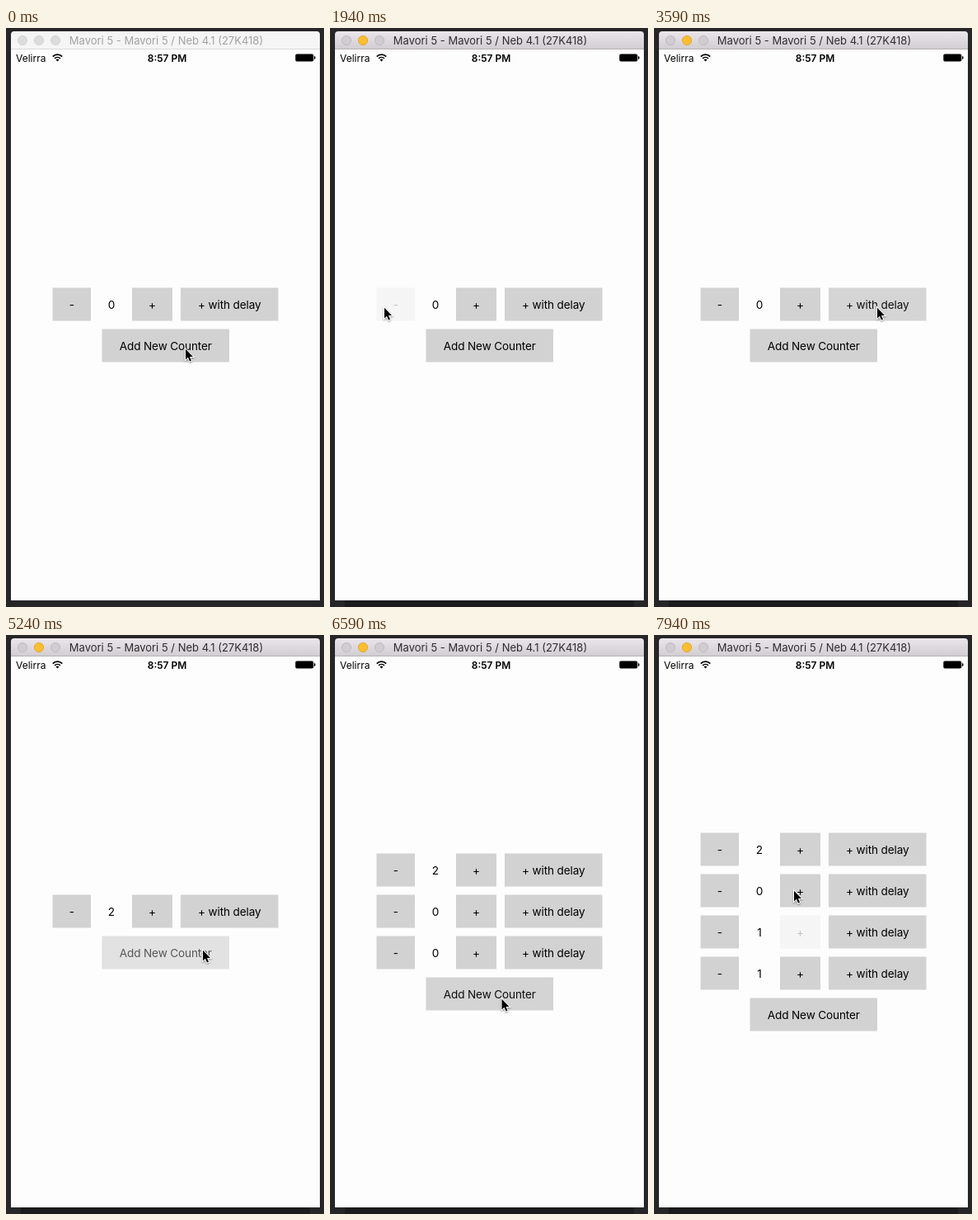
An HTML page with a canvas that plays this animation: 386 px wide and 701 px high, repeating every 8 s.

```html
<!DOCTYPE html>
<html lang="en">
<head>
<meta charset="utf-8">
<title>Counters</title>
<style>
html, body { margin: 0; width: 100%; height: 100%; overflow: hidden; background: #262628; }
canvas { display: block; width: 386px; height: 701px; }
</style>
</head>
<body>
<canvas id="stage"></canvas>
<script>
const W = 386, H = 701, LOOP = 8000, STEP = 150;
const PRESS = 150, RELEASE = 250, DELAY = 1000, DIM = 0.2;
const ACTIVE_AT = 300;

const canvas = document.getElementById('stage');
const ctx = canvas.getContext('2d');
const dpr = window.devicePixelRatio || 1;
canvas.width = W * dpr;
canvas.height = H * dpr;

// Every change of the interface follows from these clicks.
const clicks = [
  { at: 1790, name: 'minus', row: 0 },
  { at: 2700, name: 'delay', row: 0 },
  { at: 3243, name: 'delay', row: 0 },
  { at: 5167, name: 'add' },
  { at: 6240, name: 'add' },
  { at: 6720, name: 'add' },
  { at: 7400, name: 'plus', row: 3 },
  { at: 7780, name: 'plus', row: 2 }
];

// Where the pointer goes, and between which times
const glides = [
  { from: 150, to: 1290, x: 53, y: 338 },
  { from: 1490, to: 1640, x: 65, y: 337 },
  { from: 1990, to: 2390, x: 270, y: 337 },
  { from: 3600, to: 3890, x: 297, y: 362 },
  { from: 4800, to: 5190, x: 238, y: 380 },
  { from: 5300, to: 5840, x: 214, y: 414 },
  { from: 5840, to: 6890, x: 205, y: 449 },
  { from: 7000, to: 7190, x: 169, y: 397 },
  { from: 7600, to: 7940, x: 169, y: 308 }
];

const clamp = v => Math.max(0, Math.min(1, v));
const ease = v => v < 0.5 ? 2 * v * v : 1 - 2 * (1 - v) ** 2;

function pointerAt(t) {
  let x = 217, y = 387;
  for (const g of glides) {
    const p = clamp((t - g.from) / (g.to - g.from));
    x += (g.x - x) * p;
    y += (g.y - y) * p;
  }
  return [x, y];
}

function opacity(name, row, t) {
  return clicks.filter(c => c.name === name && c.row === row).reduce((alpha, c) => {
    const down = ease(clamp((t - c.at) / PRESS));
    const up = ease(clamp((t - c.at - PRESS) / RELEASE));
    return Math.min(alpha, 1 - (1 - DIM) * (down - up));
  }, 1);
}

function countClicks(name, row, t) {
  return clicks.filter(c => c.name === name && c.row === row && c.at + PRESS <= t).length;
}

function counter(row, t) {
  return countClicks('plus', row, t) + countClicks('delay', row, t - DELAY);
}

function text(str, x, y, size, { color = '#000', weight = 400, align = 'center', spacing = 0 } = {}) {
  ctx.font = `${weight} ${size}px Inter, Roboto, sans-serif`;
  ctx.letterSpacing = spacing + 'px';
  ctx.textAlign = align;
  ctx.fillStyle = color;
  ctx.fillText(str, x, y);
}

function button(label, x, y, w, alpha) {
  ctx.globalAlpha = alpha;
  ctx.fillStyle = '#d2d2d2';
  ctx.fillRect(x, y, w, 40);
  text(label, x + w / 2, y + 25, 13.6, { spacing: -0.15 });
  ctx.globalAlpha = 1;
}

function titleBar(active) {
  ctx.beginPath();
  ctx.roundRect(6, 4, 375, 30, [4, 4, 0, 0]);
  if (active) {
    const g = ctx.createLinearGradient(0, 4, 0, 26);
    g.addColorStop(0, '#ebe6eb');
    g.addColorStop(1, '#d0ccd0');
    ctx.fillStyle = g;
  } else ctx.fillStyle = '#f5f5f5';
  ctx.fill();
  ctx.fillStyle = active ? '#b5b1b5' : '#dadada';
  ctx.fillRect(6, 25, 375, 1);

  for (let i = 0; i < 3; i++) {
    const lit = active && i === 1;
    ctx.beginPath();
    ctx.arc(20 + 20 * i, 15, 5.6, 0, Math.PI * 2);
    ctx.fillStyle = lit ? '#fdbe2f' : active ? '#d0ccd0' : '#dcdcdc';
    ctx.fill();
    ctx.lineWidth = 0.8;
    ctx.strokeStyle = lit ? '#dfa023' : active ? '#b9b5b9' : '#cecece';
    ctx.stroke();
  }
  text('Mavori 5 - Mavori 5 / Neb 4.1 (27K418)', 194.5, 20, 13,
    { color: active ? '#2e2c2e' : '#a2a2a2' });
}

function statusBar() {
  text('Velirra', 12, 41, 12, { align: 'left' });
  text('8:57 PM', 195.5, 41, 12, { weight: 600 });

  ctx.strokeStyle = ctx.fillStyle = '#000';
  ctx.lineWidth = 1.7;
  for (const r of [4.8, 8.1]) {
    ctx.beginPath();
    ctx.arc(62.5, 40.3, r, -Math.PI * 0.75, -Math.PI * 0.25);
    ctx.stroke();
  }
  ctx.beginPath();
  ctx.moveTo(62.5, 40.5);
  ctx.arc(62.5, 40.3, 2.7, -Math.PI * 0.75, -Math.PI * 0.25);
  ctx.fill();

  ctx.beginPath();
  ctx.roundRect(351.3, 31.4, 22, 9.2, 1.8);
  ctx.roundRect(374, 34.3, 1.5, 3.4, [0, 1, 1, 0]);
  ctx.fill();
}

function arrow([x, y]) {
  ctx.save();
  ctx.translate(x, y);
  ctx.beginPath();
  ctx.moveTo(1, 1.8);
  for (const [px, py] of [[1, 14.4], [3.9, 11.7], [6, 16.6], [8, 15.7], [6, 11], [10, 11]])
    ctx.lineTo(px, py);
  ctx.closePath();
  ctx.shadowColor = 'rgba(0,0,0,.4)';
  ctx.shadowBlur = 2 * dpr;
  ctx.shadowOffsetY = dpr;
  ctx.lineWidth = 2;
  ctx.strokeStyle = '#fff';
  ctx.stroke();
  ctx.shadowColor = 'transparent';
  ctx.fillStyle = '#000';
  ctx.fill();
  ctx.restore();
}

function draw(t) {
  const active = t >= ACTIVE_AT;
  ctx.setTransform(dpr, 0, 0, dpr, 0, 0);
  ctx.fillStyle = '#262628';
  ctx.fillRect(0, 0, W, H);
  if (active) {
    ctx.fillStyle = '#1c1c1e';
    ctx.fillRect(18, 693, 351, 8);
  }
  titleBar(active);
  ctx.fillStyle = '#fdfdfd';
  ctx.fillRect(6, 26, 375, 667);
  statusBar();

  const rows = 1 + countClicks('add', undefined, t);
  const top = 339.5 - 25 * rows;
  for (let i = 0; i < rows; i++) {
    const y = top + 50 * i;
    button('-', 56.5, y, 46.5, opacity('minus', i, t));
    text(counter(i, t), 128, y + 25, 13.6);
    button('+', 153, y, 49, opacity('plus', i, t));
    button('+ with delay', 212, y, 118.5, opacity('delay', i, t));
  }
  button('Add New Counter', 116.5, top + 50 * rows, 154.5, opacity('add', undefined, t));
  arrow(pointerAt(t));
}

// The picture is renewed every STEP ms, 10 ms early after the first second.
function sampled(time) {
  const lead = time < 1000 ? 0 : 10;
  return Math.floor((time + lead) / STEP) * STEP - lead;
}

const start = performance.now();
function tick() {
  draw(sampled((performance.now() - start) % LOOP));
  requestAnimationFrame(tick);
}
tick();
</script>
</body>
</html>
```
